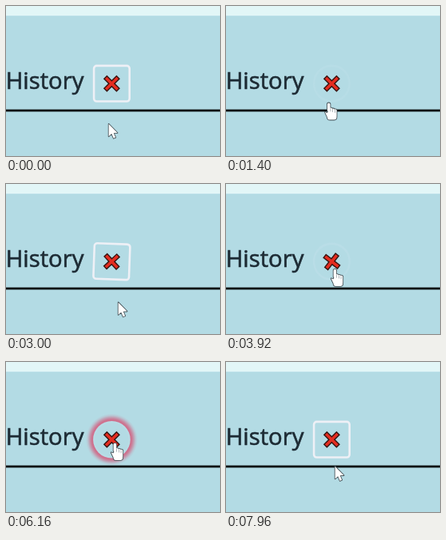
Animation, 268 px wide and 188 px high, one loop 8 s. Source, as an HTML page with a canvas:

```html
<!DOCTYPE html>
<html lang="en">
<head>
<meta charset="utf-8">
<title>History</title>
<style>
html, body { margin: 0; width: 100%; height: 100%; overflow: hidden; background: #b3dbe4; }
canvas { display: block; width: 268px; height: 188px; }
</style>
</head>
<body>
<canvas id="stage" width="268" height="188"></canvas>
<script>
const ctx = document.getElementById('stage').getContext('2d');
const LOOP = 8000, STEP = 40, TURN_MS = 600, MOVE_MS = 320;
const CX = 132.4, CY = 97.2, HALF = 22.3, RADIUS = 3.5;

// Pointer moves: start time and destination
const HOME = { x: 129, y: 148 };
const MOVES = [
  { at: 40, x: 128.5, y: 107 },
  { at: 1300, x: 132, y: 170 },
  { at: 1740, x: 137, y: 110 },
  { at: 2300, x: 141, y: 148 },
  { at: 2950, x: 141, y: 157 },
  { at: 3270, x: 137, y: 107 },
  { at: 3970, x: 137, y: 148 },
  { at: 5080, x: 137, y: 102 },
  { at: 6940, x: 137, y: 142 },
  { at: 7860, x: 137, y: 95 }
];

const clamp = v => Math.min(1, Math.max(0, v));
const smooth = v => v * v * (3 - 2 * v);
const mix = (a, b, u) => a + (b - a) * u;
const bez = (a, b, s) => 3 * a * s * (1 - s) ** 2 + 3 * b * s * s * (1 - s) + s ** 3;

// CSS "ease"
function ease(x) {
  if (x <= 0 || x >= 1) return clamp(x);
  let lo = 0, hi = 1;
  for (let i = 0; i < 24; i++) {
    const mid = (lo + hi) / 2;
    if (bez(0.25, 0.25, mid) < x) lo = mid; else hi = mid;
  }
  return bez(0.1, 1, lo);
}

// The pointer crosses the button's edge halfway through a move
function stateAt(t) {
  let { x, y } = HOME, over = false, turn = 0;
  for (const m of MOVES) {
    const u = smooth(clamp((t - m.at) / MOVE_MS));
    x = mix(x, m.x, u);
    y = mix(y, m.y, u);
    const cross = m.at + MOVE_MS / 2, inside = m.y < 115;
    if (t >= cross) {
      if (inside !== over) turn = mix(+over, +inside, ease((t - cross) / TURN_MS));
      over = inside;
    }
  }
  return { x, y, over, turn };
}

const glowAt = t => Math.sin(Math.PI * clamp((t - 5480) / 1260));

function drawPage() {
  const band = (color, y, h) => {
    ctx.fillStyle = color;
    ctx.fillRect(0, y, 268, h);
  };
  band('#b3dbe4', 0, 188);
  band('#e2f6f7', 0, 12.2);
  band('#080d0e', 129.6, 2.8);
  ctx.font = '500 29.3px "Open Sans", "Noto Sans", sans-serif';
  ctx.fillStyle = ctx.strokeStyle = '#1d2b34';
  ctx.lineWidth = 0.6;
  ctx.fillText('History', -0.3, 104);
  ctx.strokeText('History', -0.3, 104);
}

function drawGlow(level) {
  if (level <= 0) return;
  const inner = 23.3, outer = 32.5;
  const g = ctx.createRadialGradient(CX, CY, inner, CX, CY, outer);
  for (let u = 0; u <= 1; u += 0.25) {
    g.addColorStop(u, `rgba(220,55,95,${0.7 * level * (1 - smooth(u))})`);
  }
  ctx.fillStyle = g;
  ctx.beginPath();
  ctx.arc(CX, CY, outer, 0, 7);
  ctx.arc(CX, CY, inner, 0, 7);
  ctx.fill('evenodd');
}

function drawCross() {
  const bars = (color, arm, half) => {
    ctx.fillStyle = color;
    ctx.fillRect(-arm, -half, arm * 2, half * 2);
    ctx.fillRect(-half, -arm, half * 2, arm * 2);
  };
  ctx.rotate(Math.PI / 4);
  bars('#351512', 11.7, 3.2);
  bars('#e52d20', 10.3, 1.8);
}

function drawButton(turn) {
  ctx.save();
  ctx.translate(CX, CY);
  ctx.rotate(turn * Math.PI * 2);
  ctx.beginPath();
  ctx.roundRect(-HALF, -HALF, HALF * 2, HALF * 2, mix(RADIUS, HALF, turn));
  ctx.lineWidth = 2.6;
  ctx.strokeStyle = `rgba(238,240,246,${1 - 0.93 * turn})`;
  ctx.stroke();
  drawCross();
  ctx.restore();
}

const arrow = new Path2D('M0 0V15.6L3.6 12.3L6.1 18L8.6 16.9L6.2 11.4L11 11.2Z');
const hand = new Path2D('M-5 11.5L-2 12.5L2 21H-0.6Z');
hand.roundRect(-2, 10, 11.6, 11.2, 3);
for (let i = 0; i < 4; i++) {
  hand.roundRect(-2 + i * 2.7, i ? 5.4 + i * 0.8 : 0, 3.6, 11, 1.8);
}

function drawPointer(x, y, over) {
  const shape = over ? hand : arrow;
  ctx.save();
  ctx.translate(x - 0.4, y - 0.2);
  ctx.lineJoin = 'round';
  ctx.lineWidth = 1.6;
  ctx.strokeStyle = '#3c484e';
  ctx.stroke(shape);
  ctx.fillStyle = '#fff';
  ctx.fill(shape);
  if (over) {
    ctx.fillStyle = '#8b979c';
    for (let i = 1; i < 4; i++) ctx.fillRect(-1 + i * 2.7, 6 + i * 0.8, 0.7, 4);
  }
  ctx.restore();
}

function draw(t) {
  const { x, y, over, turn } = stateAt(t);
  drawPage();
  drawGlow(glowAt(t));
  drawButton(turn);
  drawPointer(x, y, over);
}

const start = performance.now();
function tick() {
  const t = (performance.now() - start) % LOOP;
  draw(Math.floor(t / STEP) * STEP);
  requestAnimationFrame(tick);
}
tick();
</script>
</body>
</html>
```
